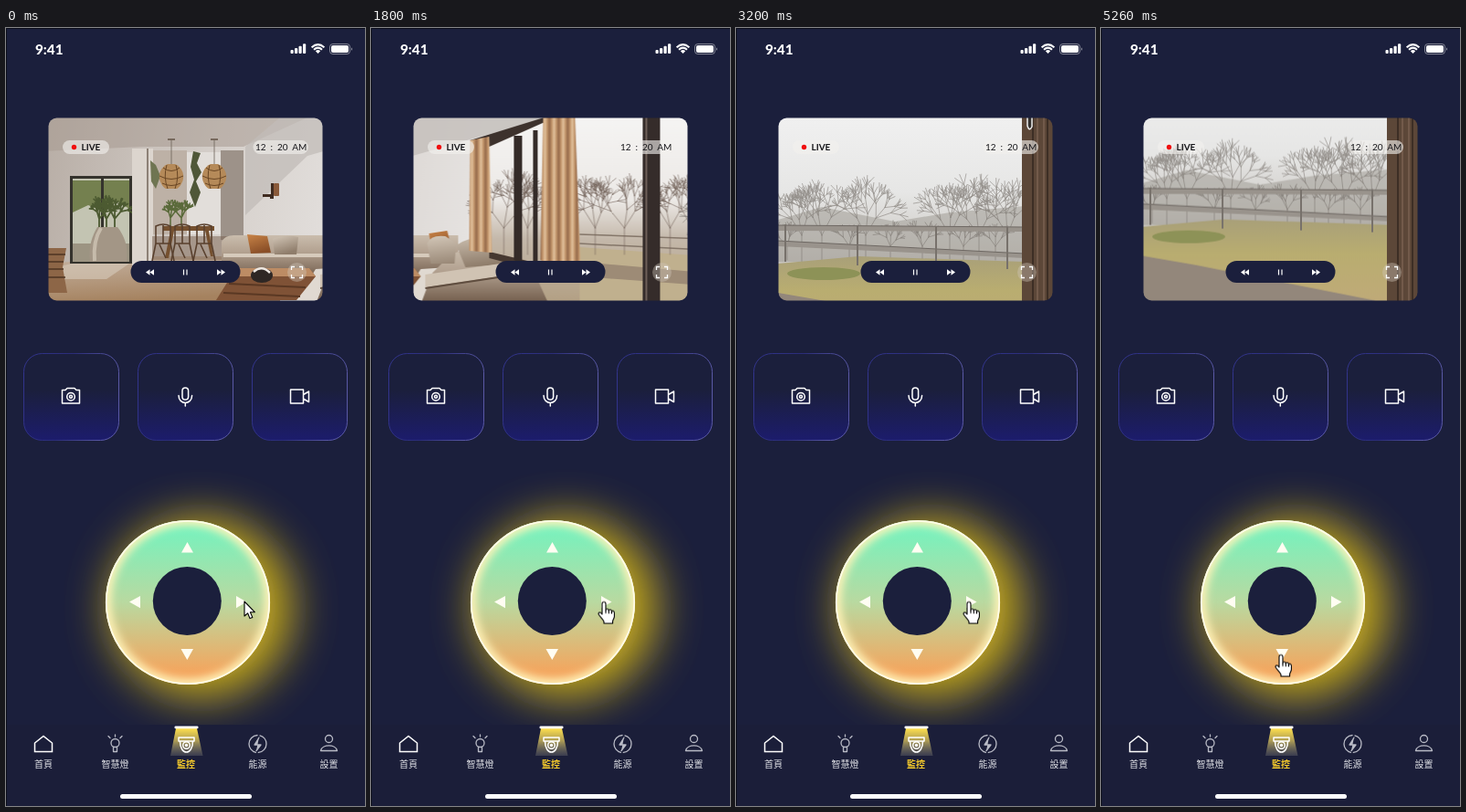
An HTML page that plays this animation: 393x852 px, repeating every 5330 ms.

```html
<!DOCTYPE html>
<html lang="zh-Hant">
<head>
<meta charset="utf-8">
<title>監控</title>
<style>
  html, body { margin: 0; width: 100%; height: 100%; overflow: hidden; background: #1b1f3c; }
  svg { display: block; width: 100vw; height: 100vh; }
  .latin { font-family: Lato, "Open Sans", sans-serif; }
  .nav text { font: 10px "Noto Sans CJK TC", "Noto Sans CJK JP", "Noto Sans CJK", sans-serif; text-anchor: middle; fill: #dfe0e6; }
  .nav .on { fill: #f6cb2c; font-weight: 700; }
  .line { fill: none; stroke: #fff; stroke-width: 1.5; stroke-linecap: round; stroke-linejoin: round; }
  .twigs { fill: none; stroke-linecap: round; }

  /* One loop is 80 ticks, so a tick is 1.25%. */
  .pan, .cursor, .hand, .arrow, .right, .down {
    animation: 5.33s step-end -7ms infinite;
  }
  .pan { animation-name: pan; }
  .cursor { animation-name: move; }
  .hand { animation-name: hand; }
  .arrow { animation-name: arrow; }
  .right { animation-name: right; }
  .down { animation-name: down; }

  @keyframes pan {
    0% { transform: translate(0, 0); }
    20% { transform: translate(-11.5px, 0); animation-timing-function: steps(11); }
    33.75% { transform: translate(-284.6px, 0); }
    35% { transform: translate(-298px, 0); }
    45% { transform: translate(-309.5px, 0); animation-timing-function: steps(11); }
    58.75% { transform: translate(-582.6px, 0); }
    60% { transform: translate(-596px, 0); }
    86.25% { transform: translate(-596px, -2px); animation-timing-function: steps(10); }
    98.75%, 100% { transform: translate(-596px, -40.4px); }
  }
  @keyframes move {
    0% { transform: translate(261px, 628px); }
    18.75% { transform: translate(255px, 628.5px); }
    73.75% { transform: translate(253px, 630px); }
    75% { transform: translate(238px, 648px); }
    76.25% { transform: translate(214px, 672px); }
    77.5% { transform: translate(200px, 684px); }
    78.75%, 100% { transform: translate(197px, 686.5px); }
  }
  @keyframes hand { 0%, 75% { opacity: 0; } 6.25%, 77.5%, 100% { opacity: 1; } }
  @keyframes arrow { 0%, 75% { opacity: 1; } 6.25%, 77.5%, 100% { opacity: 0; } }
  @keyframes right { 0%, 21.25%, 46.25%, 100% { fill: #fffdf2; } 18.75%, 43.75% { fill: #5a4fb4; } }
  @keyframes down { 0%, 86.25%, 100% { fill: #fffdf2; } 83.75% { fill: #5a4fb4; } }
</style>
</head>
<body>
<svg viewBox="0 0 393 852" preserveAspectRatio="none">
  <defs>
    <linearGradient id="wall" gradientUnits="userSpaceOnUse" x1="46" x2="400" y1="98" y2="150">
      <stop stop-color="#b8aea6"/><stop offset=".55" stop-color="#d6d0cb"/><stop offset="1" stop-color="#e5e2e0"/>
    </linearGradient>
    <linearGradient id="floor" x2=".3" y2="1"><stop stop-color="#c5b3a2"/><stop offset="1" stop-color="#a5825f"/></linearGradient>
    <linearGradient id="sofa" x2="0" y2="1">
      <stop stop-color="#cabdad"/><stop offset=".4" stop-color="#b3a291"/><stop offset="1" stop-color="#75604f"/>
    </linearGradient>
    <linearGradient id="cushion" x2=".4" y2="1"><stop stop-color="#d3c7b8"/><stop offset="1" stop-color="#8f7d6b"/></linearGradient>
    <linearGradient id="rust" x2=".4" y2="1"><stop stop-color="#c98447"/><stop offset="1" stop-color="#8a4f28"/></linearGradient>
    <linearGradient id="drape" x2="5" y2="0" gradientUnits="userSpaceOnUse" spreadMethod="reflect">
      <stop stop-color="#94694a"/><stop offset=".5" stop-color="#c1946a"/><stop offset="1" stop-color="#e2c29d"/>
    </linearGradient>
    <linearGradient id="view" x2="0" y2="1">
      <stop stop-color="#f5f4f3"/><stop offset=".45" stop-color="#ece9e6"/><stop offset=".66" stop-color="#c4b8aa"/><stop offset="1" stop-color="#b3a084"/>
    </linearGradient>
    <linearGradient id="sky" x2="0" y2="1">
      <stop stop-color="#f0f0f0"/><stop offset=".5" stop-color="#e6e6e5"/><stop offset="1" stop-color="#c4c0ba"/>
    </linearGradient>
    <linearGradient id="grass" x2="0" y2="1">
      <stop stop-color="#a9a079"/><stop offset=".4" stop-color="#b9ad70"/><stop offset="1" stop-color="#c0aa79"/>
    </linearGradient>
    <linearGradient id="card" x2="0" y2="1">
      <stop offset=".42" stop-color="#1b1f3c"/><stop offset="1" stop-color="#1c1c6c"/>
    </linearGradient>
    <linearGradient id="rim" x2="1" y2=".2">
      <stop stop-color="#33358f"/><stop offset=".5" stop-color="#2a2c78"/><stop offset="1" stop-color="#5a59a6"/>
    </linearGradient>
    <linearGradient id="dial" x2="0" y2="1">
      <stop offset=".06" stop-color="#78f1bd"/><stop offset=".5" stop-color="#b9d9a0"/><stop offset=".92" stop-color="#f3a65f"/>
    </linearGradient>
    <linearGradient id="beam" x2="0" y2="1">
      <stop stop-color="#ffe04d"/><stop offset=".45" stop-color="#c8b35a" stop-opacity=".85"/><stop offset="1" stop-color="#777" stop-opacity=".35"/>
    </linearGradient>
    <filter id="glow" x="-60%" y="-60%" width="220%" height="220%"><feGaussianBlur stdDeviation="25"/></filter>
    <filter id="soft" x="-20%" y="-20%" width="140%" height="140%"><feGaussianBlur stdDeviation="5"/></filter>
    <clipPath id="screen"><rect x="46.5" y="98.5" width="300" height="200" rx="9"/></clipPath>
    <clipPath id="disc"><circle cx="199" cy="629" r="90"/></clipPath>

    <g id="lamp">
      <path d="M0 122V150" stroke="#6d6259" stroke-width=".8"/>
      <path d="M-4 122H4" stroke="#77695d" stroke-width="2"/>
      <path d="M-4 149H4C11 152 14 159 13 165 12 171 8 175 6 176H-6C-8 175-12 171-13 165-14 159-11 152-4 149Z" fill="#b58a59"/>
      <path d="M-9 153Q0 160 9 153M-13 162Q0 169 13 162M-10 170Q0 175 10 170M-5 150Q-9 163-4 176M5 150Q9 163 4 176" fill="none" stroke="#694624"/>
    </g>
    <path id="chair" d="M-8 217Q0 213 8 217V236H-8ZM-8 236-12 255M8 236 12 255M-4 237 3 252M0 216V236" fill="none" stroke="#59402e" stroke-width="1.6"/>
    <rect id="box" x=".5" y=".5" width="104" height="95" rx="20" fill="url(#card)" stroke="url(#rim)"/>
    <path id="skip" d="M-4.5 0 0-3.2V3.2ZM0 0 4.5-3.2V3.2Z" fill="#fff"/>
  </defs>

  <rect width="393" height="852" fill="#1b1f3c"/>
  <path d="M.5 852V.5H393" fill="none" stroke="#0b0d1a"/>

  <!-- status bar -->
  <g fill="#fff">
    <text class="latin" x="32" y="29" font-size="15.3" font-weight="800">9:41</text>
    <rect x="311.5" y="24" width="3.2" height="4" rx="1"/>
    <rect x="316" y="22" width="3.2" height="6" rx="1"/>
    <rect x="320.5" y="19.8" width="3.2" height="8.2" rx="1"/>
    <rect x="325" y="17.3" width="3.2" height="10.7" rx="1"/>
    <path d="M338.8 25.2Q341.5 23 344.2 25.2L341.5 28Z"/>
    <path d="M334.6 21.3Q341.5 15 348.4 21.3M337 23.7Q341.5 19.6 346 23.7" fill="none" stroke="#fff" stroke-width="2"/>
    <rect x="354.5" y="17.5" width="22" height="11" rx="3.2" fill="none" stroke="#fff" stroke-opacity=".45"/>
    <rect x="356" y="19" width="19" height="8" rx="2"/>
    <path d="M378 21.2Q380 23 378 24.8Z" opacity=".6"/>
  </g>

  <!-- camera picture -->
  <g clip-path="url(#screen)">
    <g class="pan">
      <rect x="40" y="98" width="910" height="250" fill="url(#wall)"/>
      <path d="M40 98H330L260 130H150L40 135Z" fill="#a89c93" opacity=".55"/>
      <path d="M300 98H480L393 122 330 140 262 205V130Z" fill="#c2bcb8" opacity=".75"/>
      <path d="M40 258 160 250H300V300H40Z" fill="url(#floor)"/>
      <path d="M72 258H135L110 275H46V264Z" fill="#d8cbbd" opacity=".6"/>

      <!-- garden door and plant -->
      <rect x="70" y="162" width="68" height="96" fill="#35332d"/>
      <path d="M73 165H104V256H73ZM107 165H135V256H107Z" fill="#c3c4b2"/>
      <path d="M73 167H104V200L90 194 73 202ZM107 167H135V198L122 190 107 196Z" fill="#74804f"/>
      <path d="M73 236H135V256H73Z" fill="#9c9482"/>
      <g id="bush" class="twigs" stroke="#4c5a31" stroke-width="1.8"></g>
      <path d="M100 218H122C130 228 134 240 132 256H92C90 240 94 228 100 218Z" fill="#a39686"/>
      <path d="M104 219C97 230 96 244 97 255" fill="none" stroke="#c6bbab" stroke-width="4"/>
      <path d="M46 241H66L62 262 67 290H46Z" fill="#8d6647"/>
      <path d="M46 248H65M46 256H63M46 264H63M46 273H65" stroke="#4d3423" stroke-width="1.5"/>

      <!-- dining corner -->
      <rect x="138" y="132" width="23" height="128" fill="#dcd5ce"/>
      <rect x="161" y="134" width="37" height="92" fill="#bdb1a6"/>
      <rect x="198" y="136" width="37" height="90" fill="#e2dedA"/>
      <rect x="235" y="134" width="25" height="98" fill="#9d9289"/>
      <path d="M155 132V262" stroke="#8d8076" stroke-width="2"/>
      <path d="M205 135 213 137 209 148 214 158 208 168 213 180 207 196 201 180 206 166 202 152Z" fill="#4f5738"/>
      <path d="M158 145 164 150 169 162 164 176 159 168Z" fill="#6f7552"/>
      <g id="pot" class="twigs" stroke="#5a6a3a" stroke-width="1.5"></g>
      <path d="M160 228H250V254H160Z" fill="#7b6350" opacity=".5"/>
      <path d="M172 217H228V222H172ZM180 222 174 252H178L184 222ZM218 222 224 250H227L222 222Z" fill="#75502f"/>
      <use href="#chair" x="172"/><use href="#chair" x="193"/><use href="#chair" x="217"/>
      <use href="#lamp" x="181"/><use href="#lamp" x="228"/>

      <!-- sofa, table, wall light -->
      <path d="M281 182H290V170H293V187H289V185H281Z" fill="#3f2b20"/>
      <rect x="293" y="170" width="6" height="14" rx="1" fill="#8a5a3a"/>
      <path d="M236 234Q240 226 252 227H380V272H236Z" fill="url(#sofa)"/>
      <path d="M238 247H380V251H238Z" fill="#d6cabb"/>
      <path d="M292 231Q306 225 320 229L318 248H294Z" fill="url(#cushion)"/>
      <path d="M264 226 286 228 290 246 268 247Z" fill="url(#rust)"/>
      <path d="M348 225 368 222 373 242 352 246Z" fill="url(#rust)"/>
      <path d="M318 298 339 264 370 262 400 272V300Z" fill="#e0d9d1"/>
      <path d="M370 250Q384 240 408 243L452 246Q468 250 466 272L480 300H340L352 268Z" fill="url(#sofa)"/>
      <path d="M346 236Q350 226 366 228L378 236 376 258H350ZM378 238Q394 226 424 230 448 234 453 252L440 258 388 262Z" fill="url(#cushion)"/>
      <path d="M344 270 440 256 462 259 464 266 344 284Z" fill="#d0c3b3"/>
      <path d="M344 285 464 267" stroke="#5f4d3f" stroke-width="2"/>
      <path d="M252 263H332L339 272 318 298H230Z" fill="#7f5236"/>
      <path d="M252 263H332L339 272H246Z" fill="#bd8c64"/>
      <path d="M244 280 328 284M238 290 322 294" stroke="#5a3823" stroke-width="2"/>
      <ellipse cx="280" cy="271" rx="12" ry="8" fill="#2e2724"/>
      <path d="M271 267Q280 259 289 268" fill="none" stroke="#eee8e2" stroke-width="2.5"/>

      <!-- windows and curtains -->
      <path d="M414 122 474 98H650V300H478L458 256 414 246Z" fill="url(#view)"/>
      <path d="M513 240 650 250V300H513Z" fill="#c0b08e"/>
      <path d="M513 256 650 268V282L513 272Z" fill="#9d8b76"/>
      <path d="M513 226 650 231M513 236 650 243" stroke="#85776a" stroke-width="1.5"/>
      <g id="yard" class="twigs" stroke="#6f6056" stroke-width=".7" opacity=".8"></g>
      <path d="M393 123 474 98H486L414 130Z" fill="#3d322d"/>
      <path d="M414 245 460 256 513 268V277L460 264 414 252Z" fill="#463830"/>
      <path d="M441 118H450V258L441 254ZM462 112H467V258H462Z" fill="#342b28"/>
      <path d="M582 98H601V300H582Z" fill="#352c2a"/>
      <path d="M586 98V300" stroke="#6d5f58" stroke-width="2"/>
      <path d="M393 123 414 119 417 246 392 244Z" fill="url(#drape)"/>
      <path d="M473 98H508L514 264 488 262 470 254Z" fill="url(#drape)"/>

      <!-- outdoors -->
      <rect x="642" y="98" width="298" height="165" fill="url(#sky)"/>
      <path d="M642 210 690 196 770 212 830 202 912 195V256H642Z" fill="#a39e98" opacity=".55"/>
      <g id="trees" class="twigs" stroke="#7a746f" stroke-width=".7" opacity=".75"></g>
      <path d="M642 258 730 250 912 256V345H642Z" fill="url(#grass)"/>
      <ellipse cx="692" cy="269" rx="40" ry="7" fill="#8d9257"/>
      <path d="M642 290 700 300 790 318 912 342V350H642Z" fill="#93877b"/>
      <path d="M642 216 912 218V223L642 222ZM642 233 912 247V252L642 239Z" fill="#99938c"/>
      <path d="M642 216 912 218M642 233 912 247" stroke="#6e6863"/>
      <path d="M650 215V256M729 216V260M815 217V262M893 218V264" stroke="#77716b" stroke-width="2"/>
      <rect x="909" y="98" width="40" height="250" fill="#5c4738"/>
      <path d="M921 98V345M937 98V345" stroke="#3d2e25" stroke-width="2"/>
      <path d="M926 98V345M933 98V345" stroke="#7a6150" stroke-width="1.5"/>
      <path d="M915 98V107Q917 114 920 108V98" fill="#33302e" stroke="#eee" stroke-width="1.5"/>
    </g>

    <rect x="62" y="123" width="51" height="15" rx="7.5" fill="#f3f0ed" opacity=".62"/>
    <rect x="270.5" y="123" width="60.5" height="15" rx="7.5" fill="#f3f0ed" opacity=".62"/>
    <circle cx="74.5" cy="130.5" r="2.7" fill="#f00d0d"/>
    <g class="latin" font-size="10" fill="#16161a">
      <text x="82.5" y="134.3" font-weight="700">LIVE</text>
      <text x="273" y="134.3" word-spacing="2.4">12 : 20 AM</text>
    </g>
    <rect x="136.5" y="255" width="120" height="24" rx="12" fill="#1b1f3c"/>
    <use href="#skip" x="157.5" y="267.5"/>
    <use href="#skip" transform="translate(235.5 267.5) scale(-1 1)"/>
    <path d="M194.5 264.5V270.5M198 264.5V270.5" stroke="#fff" stroke-width="1.2"/>
    <circle cx="318.5" cy="267.5" r="10.5" fill="#cfc5ba" opacity=".4"/>
    <path d="M312.5 265V261.5H316M321 261.5H324.5V265M324.5 270V273.5H321M316 273.5H312.5V270" fill="none" stroke="#fff" stroke-width="1.3"/>
  </g>

  <!-- action cards -->
  <use href="#box" x="19" y="356"/>
  <use href="#box" x="144" y="356"/>
  <use href="#box" x="269" y="356"/>
  <g class="line" stroke-linejoin="miter">
    <path d="M61.5 396.5H65L67 394.5H75L77 396.5H80.5V411H61.5Z"/>
    <circle cx="71" cy="403.8" r="4.3"/><circle cx="71" cy="403.8" r="1.5"/>
    <rect x="193" y="394" width="6.6" height="13" rx="3.3"/>
    <path d="M189 402.5C189 413 203.6 413 203.6 402.5M196.3 410.5V414"/>
    <path d="M311.5 396H325.5V411H311.5ZM325.5 401.5 331.5 398V409.5L325.5 406Z"/>
  </g>

  <!-- direction dial -->
  <circle cx="214" cy="635" r="99" fill="#f0cc14" opacity=".82" filter="url(#glow)"/>
  <circle cx="199" cy="629" r="90" fill="url(#dial)"/>
  <g clip-path="url(#disc)">
    <circle cx="199" cy="629" r="90" fill="none" stroke="#fff3b8" stroke-width="12" filter="url(#soft)"/>
  </g>
  <circle cx="199" cy="629" r="89.2" fill="none" stroke="#fffbe6" stroke-width="1.8"/>
  <circle cx="198.3" cy="627.5" r="37.5" fill="#1b1f3c"/>
  <g fill="#fffdf2">
    <path d="M198.5 563 205 574.5H192Z"/>
    <path d="M135 628.5 147 622V635.2Z"/>
    <path class="right" d="M263.5 628.5 252 622V635.2Z"/>
    <path class="down" d="M198.3 692 191.5 680H205Z"/>
  </g>

  <!-- navigation -->
  <g class="nav">
    <rect x="1" y="763" width="392" height="89" fill="#1b1e39"/>
    <path d="M186 767H209L215.5 797H180Z" fill="url(#beam)"/>
    <rect x="184.5" y="764.5" width="26" height="2.8" rx="1" fill="#fff"/>
    <g class="line">
      <path d="M31.5 783 41 775.5 50.5 783V792.5H31.5Z" stroke-linejoin="miter"/>
      <g stroke="#b9bbc6" stroke-width="1.3">
        <circle cx="119.5" cy="783" r="4.5"/>
        <path d="M117.5 787.5V792.5H121.5V787.5M119.5 774V776M112 775.5 114 777.5M127 775.5 125 777.5"/>
        <circle cx="275.5" cy="784" r="9.5" stroke-dasharray="27 3" stroke-dashoffset="13"/>
        <path d="M277 777 272 785H279L274 791.5" fill="#b9bbc6"/>
        <circle cx="353.5" cy="778.5" r="4"/>
        <path d="M344.5 791.5C346 784 361 784 362.5 791.5Z"/>
      </g>
      <path d="M189 777H206V781H189ZM190.5 781C190.5 797 204.5 797 204.5 781"/>
      <circle cx="197.5" cy="785.5" r="3.8"/><circle cx="197.5" cy="785.5" r="1"/>
    </g>
    <text x="41" y="809.5">首頁</text>
    <text x="119.5" y="809.5">智慧燈</text>
    <text x="197" y="809.5" class="on">監控</text>
    <text x="275.5" y="809.5">能源</text>
    <text x="353.5" y="809.5">設置</text>
    <rect x="125" y="839" width="144" height="5" rx="2.5" fill="#fff"/>
  </g>

  <g class="cursor" fill="#fff" stroke="#000" stroke-width="1.1" stroke-linejoin="round">
    <path class="arrow" d="M0 0V16L3.6 12.8 6 18.6 8.8 17.4 6.4 11.7H11.3Z"/>
    <g class="hand">
      <path d="M-2 2C-2-.6 2-.6 2 2V9C2.3 7.3 5 7.4 5.3 9.3 6 8 8.3 8.3 8.5 10.3 9.5 9.4 11.4 10 11.4 12V16C11.4 18 10 19 9.6 21V23.5H0V21.5C-1 19-4 16.5-5.6 14-6.8 12-4.5 10.8-3.2 12.2L-2 13.5Z"/>
      <path d="M2 9V12.5M5.3 9.3V12.8M8.5 10.3V13" fill="none"/>
    </g>
  </g>
</svg>
<script>
  let seed = 7;
  const rand = () => (seed = seed * 16807 % 2147483647) / 2147483647;

  // Branching plant as one path: every branch splits into three shorter ones.
  function tree(x, y, len, angle, depth) {
    const x2 = x + len * Math.cos(angle), y2 = y + len * Math.sin(angle);
    let d = `M${x.toFixed(1)} ${y.toFixed(1)}L${x2.toFixed(1)} ${y2.toFixed(1)}`;
    if (depth > 0) {
      for (let i = -1; i <= 1; i++) {
        d += tree(x2, y2, len * (.6 + .25 * rand()), angle + i * .5 + (rand() - .5) * .5, depth - 1);
      }
    }
    return d;
  }

  function plant(id, xs, ground, len, depth) {
    const path = document.createElementNS("http://www.w3.org/2000/svg", "path");
    path.setAttribute("d", xs.map(x => tree(x, ground, len, -Math.PI / 2, depth)).join(""));
    document.getElementById(id).append(path);
  }

  plant("bush", [102, 110, 119], 222, 13, 3);
  plant("pot", [180, 192], 218, 10, 3);
  plant("yard", [430, 456, 530, 562, 612, 636], 248, 29, 4);
  plant("trees", [668, 690, 738, 830, 862, 893], 256, 29, 4);
  plant("trees", [652, 720, 765, 800, 845, 880], 254, 15, 3);
</script>
</body>
</html>
```
